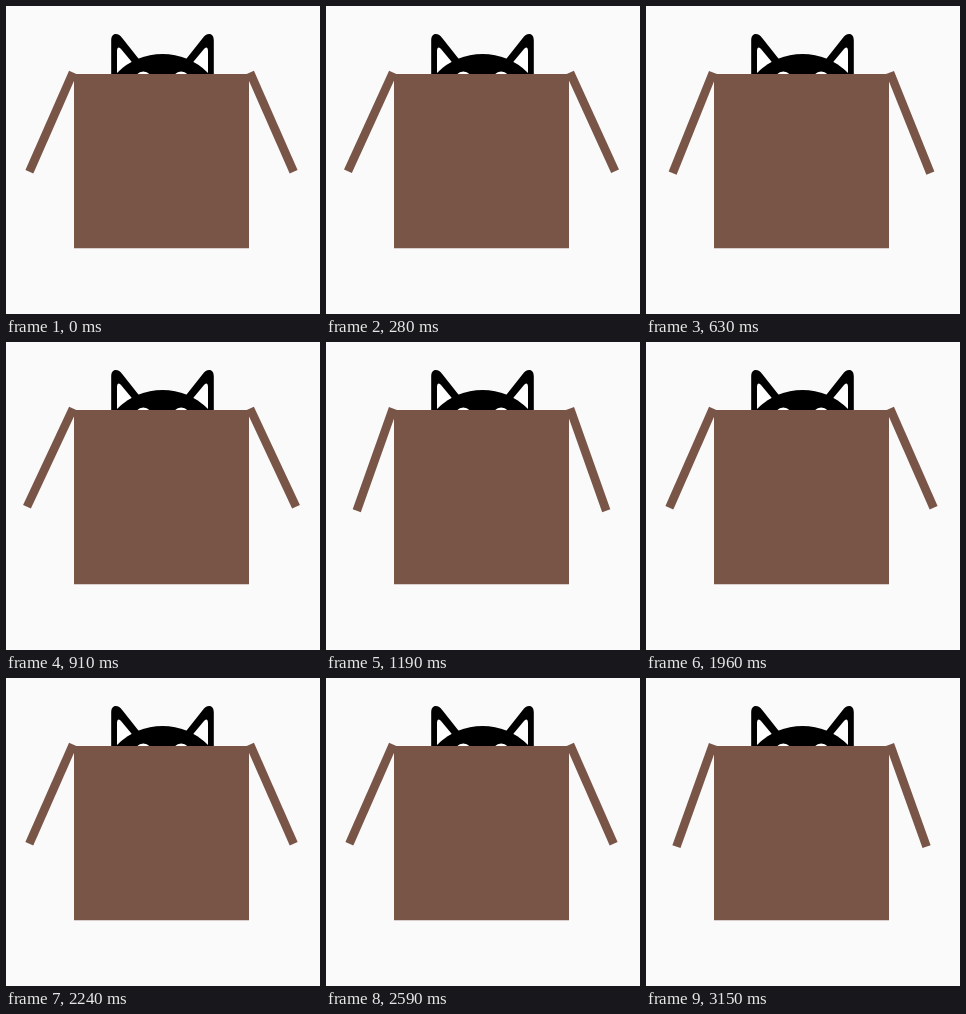
Write an HTML page that moves like this. It is 314 px wide and 308 px high and loops after 3220 ms.

```html
<!DOCTYPE html>
<html lang="en">
<head>
<meta charset="utf-8">
<title>Cat in a box</title>
<style>
  html, body { margin: 0; width: 100%; height: 100%; overflow: hidden; background: #fafafa; }
  svg { display: block; width: 314px; height: 308px; }
  .flap { stroke: #795548; stroke-width: 8.6; }
</style>
</head>
<body>
<svg viewBox="0 0 314 308">
  <defs>
    <g id="ear">
      <path d="M105.2 72V35C105.2 30 107 28 109.8 28C112.3 28 114.3 29.5 116.2 32L134 54.5L125 72Z"/>
      <path d="M111 70V45C111 41 113.3 40.6 115 43L127.5 58L118 70Z" fill="#fff"/>
    </g>
  </defs>
  <use href="#ear"/>
  <use href="#ear" transform="translate(313 0) scale(-1 1)"/>
  <circle cx="156.5" cy="112" r="64"/>
  <g fill="#fff">
    <circle cx="137.3" cy="74.5" r="9"/>
    <circle cx="175.2" cy="74.5" r="9"/>
  </g>
  <!-- hides the part of the cat inside the box -->
  <rect x="68" y="68" width="175" height="174.5" fill="#795548"/>
  <path d="M68 242.5H243V308H68Z" fill="#fafafa"/>
  <line class="flap" x1="67" y1="66.5" x2="67" y2="175"/>
  <line class="flap" x1="244" y1="66.5" x2="244" y2="175"/>
</svg>
<script>
  const LOOP = 3220, TICK = 70;
  const MID = 23, SWING = 4.2;
  // [tick, swing cycles]; whole cycles are the widest pose
  const pace = [[0, 0.777], [9, 1.706], [13, 2.167], [22, 3.129],
                [28, 3.777], [37, 4.777], [45, 5.606], [46, 5.777]];
  const [left, right] = document.querySelectorAll('.flap');

  function cyclesAt(tick) {
    const i = pace.findIndex(([t]) => t > tick);
    const [t0, c0] = pace[i - 1], [t1, c1] = pace[i];
    return c0 + (c1 - c0) * (tick - t0) / (t1 - t0);
  }

  function draw(now) {
    const tick = Math.floor((now % LOOP) / TICK);
    const angle = MID + SWING * Math.cos(2 * Math.PI * cyclesAt(tick));
    left.setAttribute('transform', `rotate(${angle} 67 66.5)`);
    right.setAttribute('transform', `rotate(${-angle} 244 66.5)`);
  }

  const start = performance.now();
  function loop() {
    draw(performance.now() - start);
    requestAnimationFrame(loop);
  }
  loop();
</script>
</body>
</html>
```
